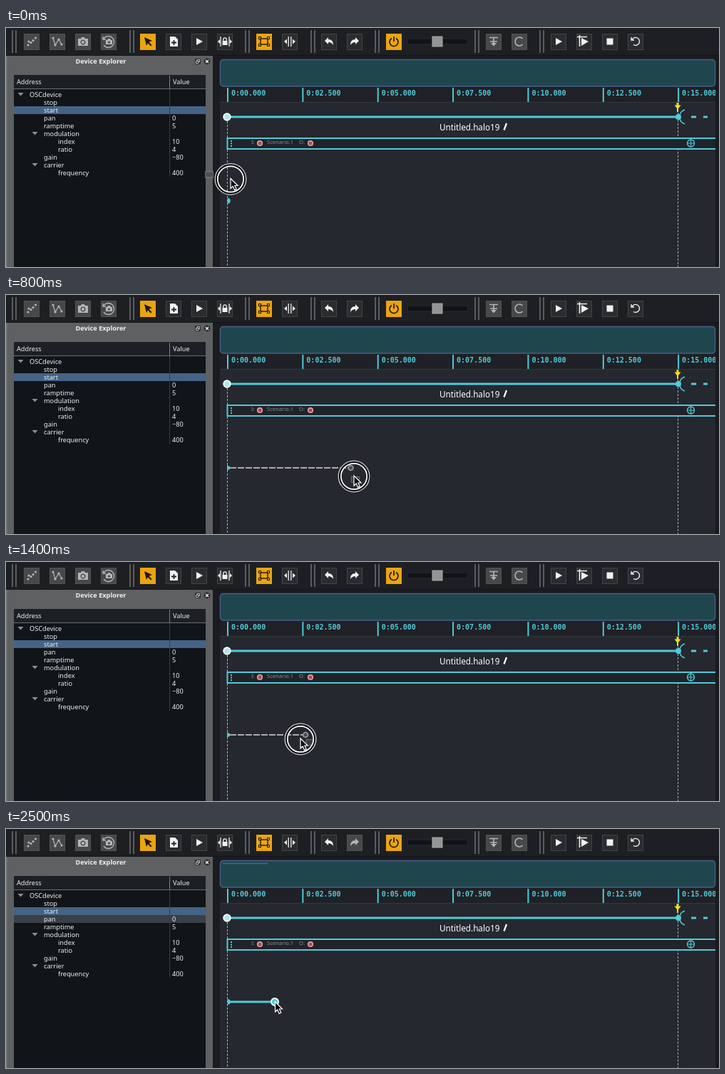
Recreate the animation shown at these times as an HTML page. Size 1000x336 px, loop 2.6 s.

```html
<!DOCTYPE html>
<html lang="en">
<head>
<meta charset="utf-8">
<title>Timeline drag</title>
<style>
  html, body { margin: 0; width: 100%; height: 100%; overflow: hidden; background: #1d1e22; }
  svg { display: block; width: 1000px; height: 336px; }
  text { font-family: "Noto Sans", "Open Sans", sans-serif; font-size: 9.2px; fill: #eef0f1; white-space: pre; }
  .time { font: bold 10px "DejaVu Sans Mono", monospace; fill: #4fcbd8; }
  .small { font-size: 7.6px; fill: #8d9094; }
</style>
</head>
<body>
<svg id="stage" viewBox="0 0 1000 336"></svg>
<script>
const NS = "http://www.w3.org/2000/svg";
const stage = document.getElementById("stage");
const CYAN = "#4fcbd8", ORANGE = "#eba410", WHITE = "#f2f2f2", INK = "#1d1810";

function add(tag, attrs, parent = stage) {
  const el = document.createElementNS(NS, tag);
  for (const k in attrs) el.setAttribute(k, attrs[k]);
  parent.appendChild(el);
  return el;
}
const group = (attrs = {}, parent = stage) => add("g", attrs, parent);
const rect = (x, y, width, height, fill, more = {}, parent) =>
  add("rect", { x, y, width, height, fill, ...more }, parent);
const circle = (cx, cy, r, more = {}, parent) => add("circle", { cx, cy, r, ...more }, parent);
const fill = (d, color, parent) => add("path", { d, fill: color }, parent);
const line = (d, stroke, width, more = {}, parent) =>
  add("path", { d, stroke, "stroke-width": width, fill: "none", ...more }, parent);
function label(x, y, str, more = {}) {
  const el = add("text", { x, y, ...more });
  el.textContent = str;
  return el;
}

// Toolbar
rect(0, 0, 1000, 38, "#1e1f23");
rect(0, 38, 1000, 1, "#131417");
for (const x of [9, 174, 336, 428, 518, 658, 749])
  line(`M${x} 3V35M${x + 5} 3V35`, "#626366", 1.8);

const play = "M-4 -5L5 0L-4 5Z";
const undo = "M-6 -1L-1 -6V-3C4 -3 6 0 6 5C4 2 2 1 -1 1V4Z";
const redo = "M6 -1L1 -6V-3C-4 -3 -6 0 -6 5C-4 2 -2 1 1 1V4Z";

const icons = {
  dots(g, c) {
    for (const [x, y] of [[-5, 5], [-4, 0], [-1, 1.5], [2, -1.5], [5.5, -5]])
      circle(x, y, 1.6, { fill: c }, g);
  },
  curve(g, c) {
    line("M-6 -5L-3 5L2 -3L6 4", c, 1.2, {}, g);
    for (const [x, y] of [[-6, -5], [-3, 5], [2, -3], [6, 4]]) circle(x, y, 1.6, { fill: c }, g);
  },
  camera(g, c) {
    fill("M-7 -4H-3L-2 -6H2L3 -4H7V6H-7Z", c, g);
    circle(0, 1, 2.8, { fill: c, stroke: "#45464a", "stroke-width": 1.3 }, g);
  },
  reload(g, c) {
    line("M-7 -4A8 8 0 1 1 -7 5M-8 -7V-3H-4", c, 1.4, {}, g);
    fill("M-4 -2H-2L-1 -4H2L3 -2H5V4H-4Z", c, g);
    circle(.5, 1, 1.6, { fill: "#45464a" }, g);
  },
  arrow(g, c) { fill("M-5 -6L6 -1L1.5 .8L5.5 5L4 6.5L0 2.3L-2 6Z", c, g); },
  page(g, c) {
    fill("M-5 -7H2L6 -3V7H-5Z", c, g);
    line("M.5 -2V5M-3 1.5H4", "#25262a", 1.8, {}, g);
  },
  play(g, c) { fill(play, c, g); },
  lock(g, c) {
    rect(-3.5, -1, 7, 6, c, {}, g);
    line("M-2.2 -1V-3A2.2 2.2 0 0 1 2.2 -3V-1M-6 -7V7M6 -7V7", c, 1.3, {}, g);
    fill("M-10 0L-7 -3V3ZM10 0L7 -3V3Z", c, g);
  },
  frame(g, c) {
    rect(-5, -4, 10, 8, "none", { stroke: c, "stroke-width": 1.4 }, g);
    for (const x of [-6, 6]) for (const y of [-5, 5])
      rect(x - 1.5, y - 1.5, 3, 3, ORANGE, { stroke: c }, g);
  },
  split(g, c) {
    line("M-1.8 -7V7M1.8 -7V7", c, 1.3, {}, g);
    fill("M-8 0L-4 -3.5V3.5ZM8 0L4 -3.5V3.5Z", c, g);
  },
  undo(g, c) { fill(undo, c, g); },
  redo(g, c) { fill(redo, c, g); },
  power(g, c) { line("M-3 -4.5A6 6 0 1 0 3 -4.5M0 -7V0", c, 1.7, {}, g); },
  anchor(g, c) {
    line("M-6 -5.5H6M0 -5V5M-5 0H5", c, 1.7, {}, g);
    fill("M-4 2H4L0 6.5Z", c, g);
  },
  letter(g, c) { line("M4.5 -4A6 6 0 1 0 4.5 4", c, 1.6, {}, g); },
  playFrom(g, c) {
    line("M-10 -6.5H4M-6.5 -9V7", c, 1.6, {}, g);
    fill("M-4 -5L6 0L-4 6Z", c, g);
  },
  stop(g, c) { rect(-4.5, -4.5, 9, 9, c, {}, g); },
  rewind(g, c) { line("M-5 -2.5A5.5 5.5 0 1 1 -3 4.5M-6 -6V-2H-2", c, 1.4, {}, g); }
};

function button(x, icon, style = "on") {
  const g = group({ transform: `translate(${x} 19)` });
  const [bg, edge, ink] = {
    on: ["#2b2c30", "#434448", WHITE],
    off: ["#474849", "#525355", "#b4b5b7"],
    lit: [ORANGE, ORANGE, INK]
  }[style];
  rect(-10.5, -10.5, 21, 22, bg, { stroke: edge }, g);
  icons[icon](g, ink);
  return g;
}
["dots", "curve", "camera", "reload"].forEach((n, i) => button(36 + 36 * i, n, "off"));
button(199, "arrow", "lit");
["page", "play", "lock"].forEach((n, i) => button(235 + 36 * i, n));
button(362, "frame", "lit");
button(398, "split");
button(453, "undo");
const redoOn = button(489, "redo"), redoOff = button(489, "redo", "off");
button(544, "power", "lit");
rect(563, 15, 84, 8, "#121316", { stroke: "#292a2e" });
rect(598, 12, 14, 14, "#939496", { stroke: "#a7a8aa" });
button(684, "anchor", "off");
button(720, "letter", "off");
["play", "playFrom", "stop", "rewind"].forEach((n, i) => button(775 + 36 * i, n));

// Device tree
rect(0, 39, 290, 297, "#5f6061");
rect(0, 39, 1.5, 297, "#77787a");
label(133, 50, "Device Explorer", { "text-anchor": "middle", "font-weight": 600 });
rect(265, 43, 8, 8, "#2a2b2d", { rx: 2 });
line("M266.5 46.5H270V49.5H266.5ZM268 46V44.5H271.5V47.5H270", "#e8e8e8", .8);
circle(282, 47, 4.4, { fill: "#2a2b2d" });
line("M280 45L284 49M284 45L280 49", "#f4f4f4", 1.3);
rect(10, 65, 270, 272, "#111518");
rect(10, 66, 270, 19, "#1c1f23");
line("M10 65.5H280M10.5 65V336", "#747678", .8);
line("M10 85.5H280", "#6c6f72", 1);
rect(11, 110, 269, 11, "#446387");
const panRow = rect(11, 121, 269, 11, "#394046");
line("M229.5 67V85", "#7c7f82", 1);
line("M229.5 86V209", "#393d41", 1);
label(15, 79, "Address");
label(234, 79, "Value");
const rows = [
  [33, "OSCdevice"], [53, "stop"], [53, "start"], [53, "pan", "0"], [53, "ramptime", "5"],
  [53, "modulation"], [73, "index", "10"], [73, "ratio", "4"], [53, "gain", "\u221280"],
  [53, "carrier"], [73, "frequency", "400"]
];
rows.forEach(([x, name, value = ""], i) => {
  const y = 97 + 11 * i;
  label(x, y, name);
  label(233, y, value);
});
for (const [x, y] of [[20.5, 93], [40.5, 148], [40.5, 192]])
  fill(`M${x - 4} ${y - 2}h8l-4 4.5z`, "#8d9092");

// Score
rect(290, 39, 10, 297, "#1b1c20");
rect(300, 39, 695, 297, "#25282f");
rect(995, 39, 5, 297, "#191a1e");
rect(300, 39, 695, 45, "#1b1c20");
rect(300.5, 44.5, 694, 37.5, "#20464d", { rx: 4, stroke: "#4a5d8c", "stroke-width": 1.4 });
const mapLine = line("M304 48.5H367", "#2f6f9c", 1.4);
rect(300, 84, 695, 20, "#1f2126");
rect(300, 104, 695, 1, "#34373d");
for (let i = 0; i < 7; i++) {
  const x = 311 + 105.35 * i, s = 2.5 * i;
  line(`M${x} 84V104`, CYAN, 2);
  label(x + 5, 94.5, `0:${s.toFixed(3).padStart(6, "0")}`, { class: "time" });
}
rect(995, 84, 5, 21, "#191a1e");

const guide = { "stroke-dasharray": "3 2" };
line("M310.5 131V336", "#adaeb1", 1, guide);
line("M942.5 119V336", "#adaeb1", 1, guide);
line("M310 125H943", CYAN, 3);
line("M961 125H968M978 125H984", CYAN, 3);
line("M952 115A10.5 10.5 0 0 0 952 135", CYAN, 1.7);
circle(943, 125, 4, { fill: CYAN });
circle(310, 125, 4.8, { fill: "#b5e6ec", stroke: "#fff", "stroke-width": 1.8 });
fill("M940.5 105H943.5V108.5H946.5L943 113V118H941V113L937.5 108.5H940.5Z", "#f5df1b");
label(608, 144, "Untitled.halo19", { style: "font-size:11.7px;font-weight:500;fill:#fff" });
line("M698.5 143.5L702 134", "#fff", 2.2);

rect(311, 155, 684, 15, "#20232a");
line("M995 155H310.5V170H995", CYAN, 2);
for (const y of [159, 162.5, 166]) rect(315, y - 1, 2, 2, CYAN);
const small = { class: "small" };
label(344, 163, "I:", small);
label(366, 163, "Scenario.1", small);
label(411, 163, "O:", small);
for (const x of [356, 427])
  circle(x, 162, 3.3, { fill: "#b2484c", stroke: "#e3a9aa", "stroke-width": 1.5 });
circle(960.5, 162, 5, { fill: "none", stroke: CYAN, "stroke-width": 1.4 });
line("M955 162H966M960.5 156.5V167.5", CYAN, 1.2);

// Dragged interval and pointer
const Y = 243;
const startDot = fill(`M310.7 ${Y - 4}A4 4 0 0 1 310.7 ${Y + 4}Z`, CYAN);
const startTip = fill(`M310 ${Y - 4}L316 ${Y}L310 ${Y + 4}Z`, CYAN);
const dashed = line("", "#aeaaae", 1.8, { "stroke-dasharray": "9 2" });
const solid = line(`M311 ${Y}H377`, CYAN, 3);
const node = circle(0, Y, 3.4, { fill: "#4a4b52", stroke: "#96949c", "stroke-width": 1.8 });
const dropped = circle(377, Y, 5, { fill: CYAN, stroke: "#fff", "stroke-width": 2 });
const ghost = group({ opacity: .65 });
rect(-5.5, -4, 11, 8, "#44474d", { stroke: "#85878c", "stroke-width": 1.2 }, ghost);
const ring = group();
circle(0, 0, 20, { fill: "none", stroke: "#0c0d10", "stroke-width": 5 }, ring);
circle(0, 0, 21.8, { fill: "none", stroke: "#d0d1d3", "stroke-width": 1.3 }, ring);
circle(0, 0, 18.2, { fill: "none", stroke: "#fff", "stroke-width": 1.7 }, ring);
const pointer = group();
add("path", {
  d: "M0 0V14L3.2 11L5.6 16.4L8.2 15.2L5.9 10H10Z",
  fill: "#0b0b0c", stroke: "#fff", "stroke-width": 1.2
}, pointer);

// time, x, y
const track = [
  [-100, 215, 208], [0, 315, 212.5], [100, 340, 223], [600, 452, 255.5], [800, 488, 255],
  [900, 500, 252], [1000, 503.5, 249], [1200, 470, 249.5], [1400, 413, 249],
  [1600, 371.5, 246.5], [1700, 370.7, 246.3], [2000, 372, 246.3], [2200, 377.5, 246.3], [2600, 377.5, 246.3]
];
function at(t) {
  let i = 1;
  while (i < track.length - 1 && t > track[i][0]) i++;
  const [t0, x0, y0] = track[i - 1], [t1, x1, y1] = track[i];
  const k = (t - t0) / (t1 - t0);
  return [x0 + (x1 - x0) * k, y0 + (y1 - y0) * k];
}
const show = (el, on) => el.setAttribute("visibility", on ? "visible" : "hidden");
const move = (el, x, y) => el.setAttribute("transform", `translate(${x} ${y})`);

function draw(t) {
  const drag = t >= 100, released = t >= 2400, done = t >= 2500;
  const [x, y] = at(t);
  const [lagX, lagY] = at(t - 25); // the score trails the pointer
  move(ring, x, y);
  move(pointer, released ? 377.5 : x, released ? 243 : y - 1);
  if (drag) move(ghost, lagX + 6.5, lagY + 4.5);
  else move(ghost, 285, 206);
  dashed.setAttribute("d", `M314 ${Y}H${lagX.toFixed(1)}`);
  node.setAttribute("cx", lagX);
  show(ring, !released);
  show(ghost, !released);
  show(startDot, !drag || done);
  show(startTip, drag && !done);
  show(dashed, drag && !done);
  show(node, drag && !released);
  show(solid, done);
  show(dropped, released);
  show(panRow, done);
  show(mapLine, done);
  show(redoOn, !released);
  show(redoOff, released);
}

const begin = performance.now();
function tick() {
  const t = (performance.now() - begin) % 2600;
  draw(Math.floor(t / 100) * 100);
  requestAnimationFrame(tick);
}
tick();
</script>
</body>
</html>
```
